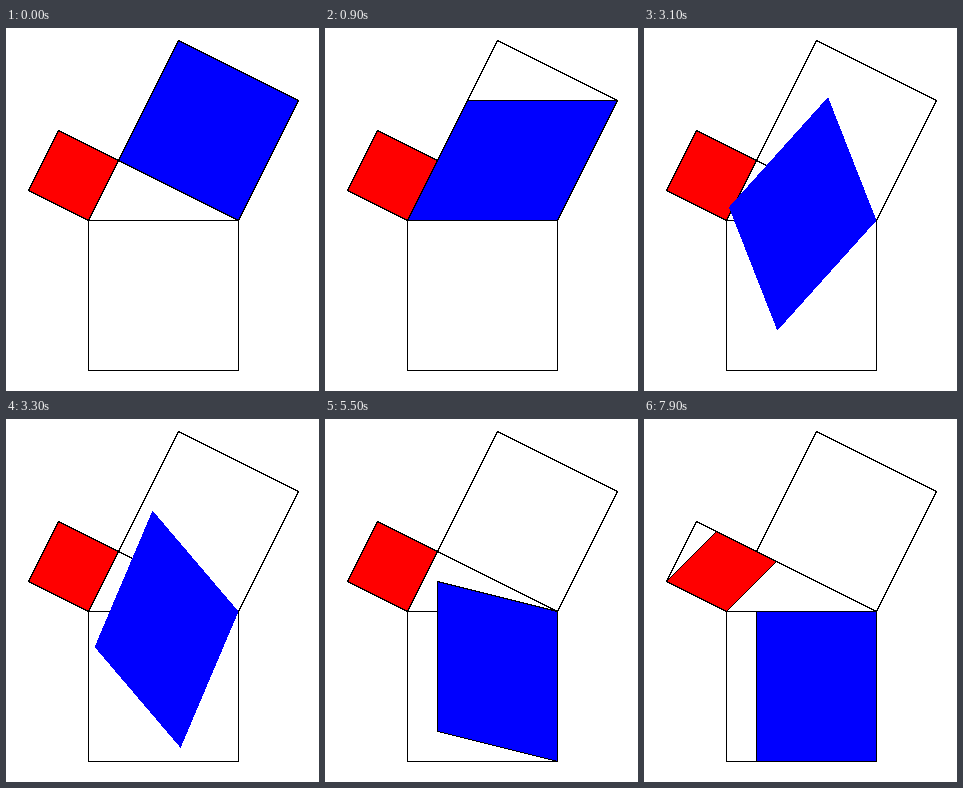
These frames come from a looping animation (313 px wide and 363 px high, 8000 ms). An HTML page:

```html
<!DOCTYPE html>
<html lang="en">
<head>
<meta charset="utf-8">
<title>Pythagoras by shearing</title>
<style>
  html, body { margin: 0; width: 100%; height: 100%; overflow: hidden; background: #fff; }
  svg { display: block; }
  polygon { stroke: #000; stroke-width: 1; fill: none; }
</style>
</head>
<body>
<svg width="313" height="363" viewBox="0 0 313 363" shape-rendering="crispEdges">
  <g id="stage" transform="translate(.5 .5)"></g>
</svg>
<script>
const LOOP = 8000;
const apex = [112, 132], left = [82, 192], right = [232, 192];

const add = (p, v, k = 1) => [p[0] + v[0] * k, p[1] + v[1] * k];
const rotate = ([x, y], degrees) => {
  const a = degrees * Math.PI / 180, c = Math.cos(a), s = Math.sin(a);
  return [x * c + y * s, y * c - x * s];
};
// Parallelogram with corner p and edge vectors u, v
const quad = (p, u, v) => [p, add(p, u), add(add(p, u), v), add(p, v)];

function polygon(fill) {
  const el = document.createElementNS("http://www.w3.org/2000/svg", "polygon");
  el.style.fill = fill;
  return document.getElementById("stage").appendChild(el);
}
const place = (el, points) => el.setAttribute("points", points.join(" "));

const smallSquare = quad(left, [-60, -30], [30, -60]);
const largeSquare = quad(right, [-120, -60], [60, -120]);
const lowerSquare = quad(left, [150, 0], [0, 150]);

for (const shape of [lowerSquare, smallSquare, largeSquare]) place(polygon("none"), shape);
const red = polygon("#f00"), blue = polygon("#00f");

// Value of the last [start, value] step reached at time t
const stepAt = (steps, t) => steps.filter(([start]) => start <= t).pop()[1];

const firstShear = [[0, 0], [500, 1 / 3], [700, 2 / 3], [900, 1]];
const turn = [[0, 0], [2900, 28], [3100, 48], [3300, 67], [3500, 90]];
const secondShear = [[0, 0], [5500, .5], [5700, 1]];
const redShear = [[0, 0], [7900, 1 / 3]];

function blueShape(t) {
  if (t < 2900) {
    return quad(right, add([-120, -60], [-30, 60], stepAt(firstShear, t)), [60, -120]);
  }
  if (t < 3500) {
    const angle = stepAt(turn, t), scale = .988;
    return quad(right, rotate([-150 * scale, 0], angle), rotate([60 * scale, -120 * scale], angle));
  }
  return quad(right, add([-120, -60], [0, 60], stepAt(secondShear, t)), [0, 150]);
}

function draw(t) {
  place(blue, blueShape(t));
  blue.style.stroke = t >= 2900 && t < 3500 ? "none" : "#000";
  place(red, quad(left, [-60, -30], add([30, -60], [60, 30], stepAt(redShear, t))));
}

const begin = performance.now();
function tick() {
  draw((performance.now() - begin) % LOOP);
  requestAnimationFrame(tick);
}
tick();
</script>
</body>
</html>
```
